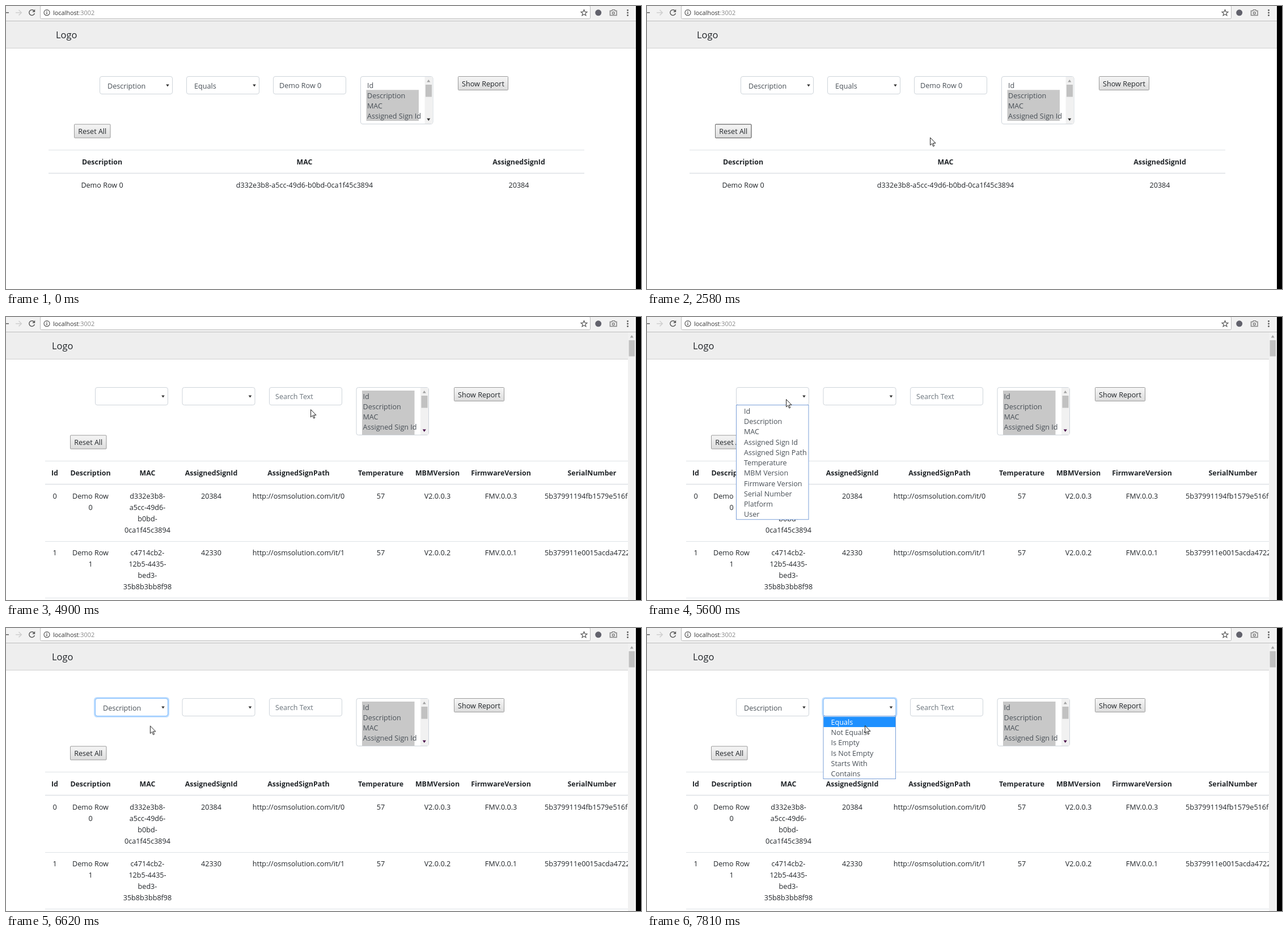
An HTML page that plays this animation: 1120 by 500 pixels, repeating every 8000 ms.

```html
<!DOCTYPE html>
<html lang="en">
<head>
<meta charset="utf-8">
<title>Report filter</title>
<style>
  html, body { margin: 0; width: 100%; height: 100%; overflow: hidden; background: #fff; }
  svg { display: block; }
  #stage { width: 1120px; height: 500px; }
  text { font: 12.6px 'Open Sans', 'Noto Sans', sans-serif; fill: #212529; white-space: pre; }
  .mid { text-anchor: middle; }
  .head { font-weight: 700; font-size: 12.4px; text-anchor: middle; }
  .field { fill: #495057; }
  .hint { fill: #6c757d; }
  .light { fill: #fff; }
  .brand { font-size: 16.4px; }
  .url { font-size: 10.85px; fill: #333; }
  .icon { fill: none; stroke: #5a5a5a; stroke-width: 1.5; }
  .control { fill: #fff; stroke: #ced4da; }
  .button { fill: url(#face); stroke: #999; }

  #cursor { animation: travel 8s infinite; }
  @keyframes travel {
    0% { transform: translate(1264px, 556px); animation-timing-function: step-end; }
    6.12% { transform: translate(1264px, 556px); animation-timing-function: steps(5, start); }
    10.95% { transform: translate(52px, 195px); }
    12.87% { transform: translate(52px, 195px); animation-timing-function: steps(7, start); }
    19.55% { transform: translate(161px, 216px); animation-timing-function: steps(3, start); }
    22.4% { transform: translate(166px, 221px); animation-timing-function: step-end; }
    26.24% { transform: translate(166px, 222px); }
    30.24% { transform: translate(166px, 222px); animation-timing-function: steps(3, start); }
    33.2% { transform: translate(499px, 232px); }
    54.37% { transform: translate(499px, 232px); animation-timing-function: steps(8, start); }
    62.2% { transform: translate(537px, 163px); animation-timing-function: steps(3, start); }
    65.1% { transform: translate(275px, 161px); }
    65.24% { transform: translate(275px, 161px); animation-timing-function: steps(4, start); }
    69.05% { transform: translate(245px, 145px); }
    70.95% { transform: translate(245px, 145px); animation-timing-function: steps(5, start); }
    75.9% { transform: translate(223px, 179px); }
    81.86% { transform: translate(223px, 179px); animation-timing-function: steps(6, start); }
    87.5% { transform: translate(408px, 140px); }
    94.6% { transform: translate(408px, 140px); animation-timing-function: steps(4, start); }
    98.6%, 100% { transform: translate(384px, 172px); }
  }
</style>
</head>
<body>
<svg id="stage" viewBox="0 0 1120 500"></svg>
<script>
const LOOP = 8000;
const ROW = 18.25;
const COLUMNS = ['Id', 'Description', 'MAC', 'Assigned Sign Id', 'Assigned Sign Path', 'Temperature',
  'MBM Version', 'Firmware Version', 'Serial Number', 'Platform', 'User'];
const OPERATORS = ['Equals', 'Not Equals', 'Is Empty', 'Is Not Empty', 'Starts With', 'Contains'];
const rules = [];

const text = (x, y, value, cls = '') => `<text x="${x}" y="${y}" class="${cls}">${value}</text>`;
const rect = (x, y, w, h, attrs) => `<rect x="${x}" y="${y}" width="${w}" height="${h}" ${attrs}/>`;
const fill = (x, y, w, h, color) => rect(x, y, w, h, `fill="${color}"`);
const path = (d, attrs = 'class="icon"') => `<path d="${d}" ${attrs}/>`;
const triangle = (x, y, dir, color, size = 3) =>
  path(`M${x - size} ${y - dir * size / 2}h${2 * size}l${-size} ${dir * size * 1.5}z`, `fill="${color}"`);

// Visible only between two times (ms) of the loop.
function during(from, to, content) {
  const id = 'show' + rules.length;
  const at = ms => (ms / LOOP * 100 - (ms % LOOP ? 0.02 : 0)).toFixed(3) + '%';
  rules.push(`@keyframes ${id}{0%{visibility:hidden}${at(from)}{visibility:visible}${at(to)}{visibility:hidden}}
    #${id}{animation:${id} ${LOOP}ms step-end infinite}`);
  return `<g id="${id}">${content}</g>`;
}

const control = (x, w = 128, h = 31) => rect(x + .5, 124.5, w, h, 'rx="3.5" class="control"');
const select = (x, value = '') =>
  control(x) + text(x + 14, 145.7, value, 'field') + triangle(x + 120, 139.8, 1, '#333', 2.8);
const button = (x, y, w, label) =>
  rect(x + .5, y + .5, w, 24, 'rx="1" class="button"') + text(x + w / 2 + .5, y + 17.5, label, 'mid');
const ring = (x, opacity = 1) => `<g fill="none" opacity="${opacity}">
  ${rect(x - .8, 123.2, 130.6, 33.6, 'rx="4.5" stroke="#bfdeff" stroke-width="2.6"')}
  ${rect(x + .5, 124.5, 128, 31, 'rx="3.5" stroke="#80bdff"')}</g>`;

function listBox(x, selectedFrom, selectedCount, arrow) {
  const rows = COLUMNS.slice(0, 5).map((name, i) => text(12, 19.5 + i * ROW, name, 'field')).join('');
  return control(x, 127.5, 84) +
    `<svg x="${x}" y="125" width="128" height="83">
      ${fill(10.5, 5 + selectedFrom * ROW, 92.5, selectedCount * ROW, '#c8c8c8')}${rows}
      ${fill(113.5, 0, 14, 83, '#f1f1f1')}${fill(115, 14, 11, 21.5, '#c1c1c1')}
      ${triangle(120.3, 8, -1, '#a3a3a3')}${triangle(120.3, 75, 1, arrow)}
    </svg>`;
}

const menuRow = (x, i, name, cls) => text(x + 14, 170.8 + i * ROW, name, cls);
const menu = (x, names) =>
  rect(x + .5, 155.5, 127.5, names.length * ROW + 1.5, 'fill="#fff" stroke="#7a9fd8"') +
  names.map((name, i) => menuRow(x, i, name, 'field')).join('');
const highlight = (x, i, name) =>
  fill(x + 1, 156.8 + i * ROW, 126.5, ROW, '#1e90ff') + menuRow(x, i, name, 'light');

const lines = (x, w, ys) => fill(x, 254, w, 1, '#dee2e6') + fill(x, 294.7, w, 1.6, '#dee2e6') +
  ys.map(y => fill(x, y, w, 1, '#dee2e6')).join('');
const table = (centers, heads, cls, y) => heads.map((s, i) => text(centers[i], y, s, cls)).join('');

const form = (x, selects, input, list) => text(x + 88, 57, 'Logo', 'brand') + selects +
  control(x + 471) + input + list + button(x + 797, 124, 88, 'Show Report') + button(x + 120, 208.5, 63.5, 'Reset All');

function filteredPage() {
  const centers = [169.5, 526.5, 904.5];
  return form(0, select(165, 'Description') + select(318, 'Equals'),
      text(482, 145, 'Demo Row 0', 'field'), listBox(625, 1, 3, '#333')) +
    lines(75, 945, []) +
    table(centers, ['Description', 'MAC', 'AssignedSignId'], 'head', 280) +
    table(centers, ['Demo Row 0', 'd332e3b8-a5cc-49d6-b0bd-0ca1f45c3894', '20384'], 'mid', 321);
}

function fullPage() {
  const centers = [86, 149, 249.5, 362, 516, 661, 761, 873, 1033.5];
  const records = [
    ['d332e3b8- a5cc-49d6- b0bd- 0ca1f45c3894', 20384, 'V2.0.0.3', 'FMV.0.0.3', '5b37991194fb1579e516fc'],
    ['c4714cb2- 12b5-4435- bed3- 35b8b3bb8f98', 42330, 'V2.0.0.2', 'FMV.0.0.1', '5b379911e0015acda47220'],
  ];
  const body = records.map(([mac, sign, mbm, firmware, serial], i) => {
    const y = 321 + i * 100;
    return table(centers, [i, 'Demo Row', '', sign, 'http://osmsolution.com/it/' + i, 57, mbm, firmware], 'mid', y) +
      text(149, y + 20, i, 'mid') + text(950, y, serial) +
      mac.split(' ').map((part, k) => text(249.5, y + 20 * k, part, 'mid')).join('');
  }).join('');
  return form(-7, select(157) + select(310.5), text(475, 145, 'Search Text', 'hint'), listBox(617.5, 0, 5, '#4a0a4a')) +
    lines(69, 1028, [396, 496]) +
    table(centers, COLUMNS.slice(0, 9).map(name => name.replaceAll(' ', '')), 'head', 280) + body +
    fill(1097, 27, 14, 473, '#f1f1f1') + fill(1098.5, 41, 10.5, 28.5, '#c1c1c1') + triangle(1103.7, 35, -1, '#a3a3a3');
}

function toolbar() {
  const dots = [7.5, 12, 16.5].map(y => `<circle cx="1096.5" cy="${y}" r="1.4" fill="#5a5a5a"/>`).join('');
  return fill(0, 0, 1111, 26, '#f2f2f2') + fill(0, 26, 1111, 1, '#bdbdbd') +
    rect(60.5, -.5, 970, 23, 'rx="2" fill="#fff" stroke="#bababa"') +
    path('M0 11.7H5') + path('M17 11.7h10M22.5 7l4.8 4.7-4.8 4.7', 'class="icon" style="stroke:#d0d0d0"') +
    path('M49.6 8.6A4.9 4.9 0 1 0 50.4 13') + path('M51.2 5.8v5h-5z', 'fill="#5a5a5a"') +
    '<circle cx="72" cy="11.7" r="5" class="icon" style="stroke-width:1.2"/>' + path('M72 11v3.6M72 8.6v1.4') +
    text(83, 15.7, 'localhost<tspan fill="#888">:3002</tspan>', 'url') +
    path('M1019.5 6.6l1.5 3.6 3.9.3-3 2.5 1 3.8-3.4-2-3.4 2 1-3.8-3-2.5 3.9-.3z', 'class="icon" style="stroke-width:1.2"') +
    '<circle cx="1044.7" cy="11.8" r="5.5" fill="#62626c"/>' +
    path('M1065.5 8.5h3l1-1.7h4l1 1.7h2.5v8h-11.5z', 'class="icon" style="stroke:#858585"') +
    '<circle cx="1071.3" cy="12.4" r="2" class="icon" style="stroke:#858585"/>' + dots;
}

const first = 157, second = 310.5;
document.getElementById('stage').innerHTML = `
  <defs><linearGradient id="face" x2="0" y2="1">
    <stop stop-color="#f6f6f6"/><stop offset="1" stop-color="#dcdcdc"/>
  </linearGradient></defs>` +
  fill(0, 0, 1120, 500, '#fff') + toolbar() +
  fill(0, 27, 1111, 47, '#eee') + fill(0, 74, 1111, 1, '#d0d0d0') +
  during(0, 3660, filteredPage()) +
  during(1335, 3660, rect(120.5, 209, 63.5, 24, 'rx="1" fill="none" stroke="#707070"')) +
  during(3660, LOOP, fullPage()) +
  during(6550, LOOP, text(first + 14, 145.7, 'Description', 'field')) +
  during(5680, 5760, ring(first, .5)) + during(5760, 7330, ring(first)) +
  during(7330, 7410, ring(first, .5) + ring(second, .5)) + during(7410, LOOP, ring(second)) +
  during(5600, 6550, menu(first, COLUMNS)) +
  during(5757, 5994, highlight(first, 0, 'Id')) +
  during(5994, 6550, highlight(first, 1, 'Description')) +
  during(7250, LOOP, menu(second, OPERATORS)) +
  during(7730, LOOP, highlight(second, 0, 'Equals')) +
  fill(1111, 0, 9, 500, '#000') +
  `<g id="cursor">${path('M.6.6V13.9L3.6 11l2.2 5 2-.9-2.2-4.8H10z', 'fill="#fff" stroke="#111" stroke-width=".95"')}</g>`;

const sheet = document.createElement('style');
sheet.textContent = rules.join('\n');
document.head.append(sheet);
</script>
</body>
</html>
```
